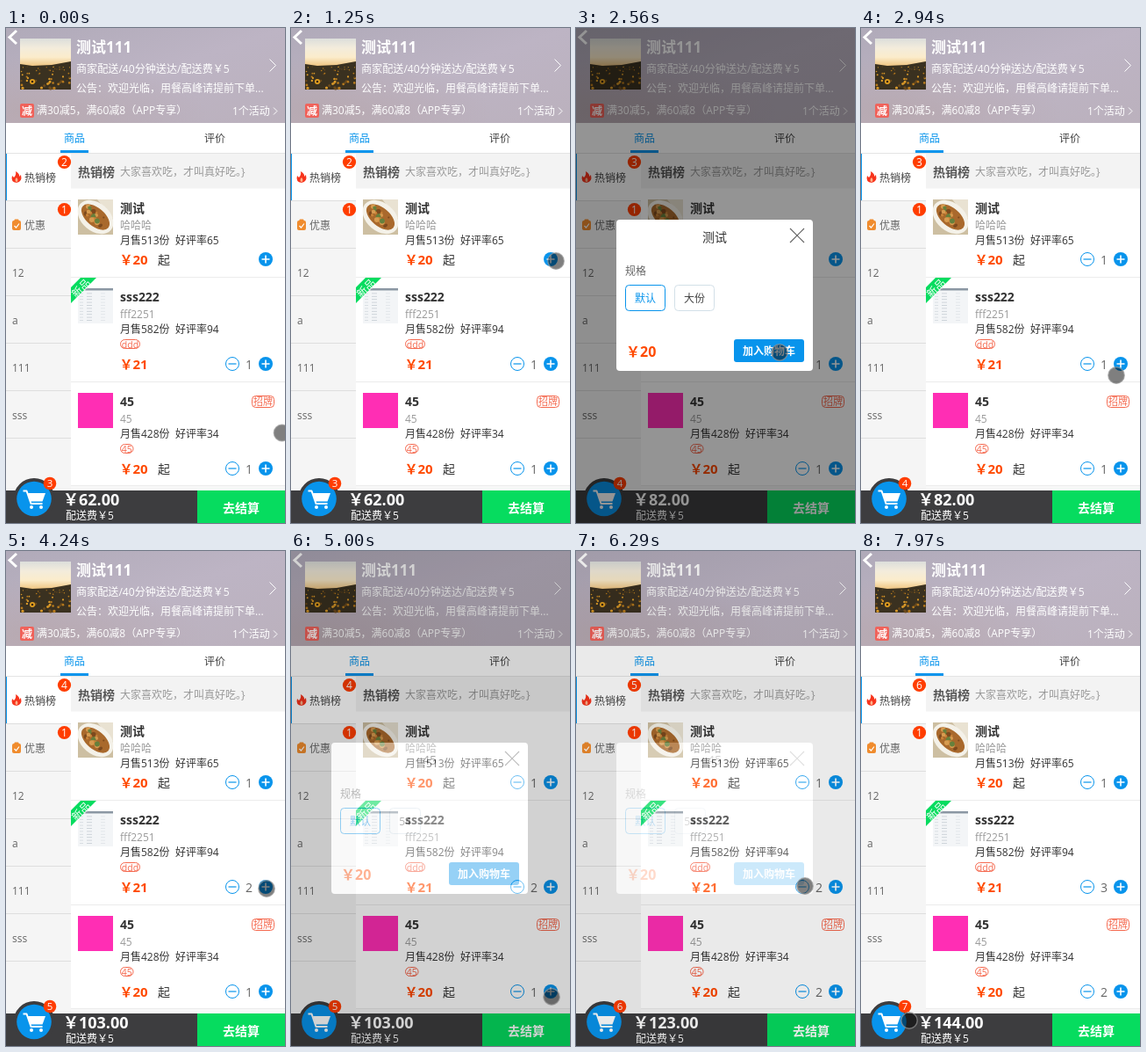
Animation of 318x563 px, one loop 8000 ms. Source, as an HTML page:

```html
<!DOCTYPE html>
<html lang="zh-CN">
<head>
<meta charset="utf-8">
<title>点餐</title>
<style>
html, body { margin: 0; width: 100%; height: 100%; overflow: hidden; background: #fff; }
svg { display: block; width: 318px; height: 563px; }
text { font-family: "Open Sans", "Noto Sans CJK SC", "Noto Sans CJK", "Noto Sans", sans-serif; white-space: pre; }
</style>
</head>
<body>
<svg id="stage" viewBox="0 0 318 563" xmlns="http://www.w3.org/2000/svg"></svg>
<script>
const BLUE = '#0894ec', RED = '#ff4a00', BADGE = '#ff3d00', TAG = '#f5694f', BAR = '#3d3d3f', GREEN = '#06dc5f';
const BOLD = 'font-weight="700"', MID = 'text-anchor="middle"';
const $ = id => document.getElementById(id);
const clamp = v => Math.max(0, Math.min(1, v));

const rect = (x, y, w, h, fill, extra = '') =>
  `<rect x="${x}" y="${y}" width="${w}" height="${h}" fill="${fill}" ${extra}/>`;
const circle = (x, y, r, fill, extra = '') =>
  `<circle cx="${x}" cy="${y}" r="${r}" fill="${fill}" ${extra}/>`;
const line = (d, color, w = 1, extra = '') =>
  `<path d="${d}" fill="none" stroke="${color}" stroke-width="${w}" ${extra}/>`;
const shape = (d, fill) => `<path d="${d}" fill="${fill}"/>`;
const text = (x, y, s, size, fill, extra = '') =>
  `<text x="${x}" y="${y}" font-size="${size}" fill="${fill}" ${extra}>${s}</text>`;
const outline = color => `stroke="${color}" stroke-width="1"`;

function seeded(seed) {
  return () => (seed = (seed * 16807) % 2147483647) / 2147483647;
}

function field() {
  const rnd = seeded(77);
  let s = rect(16, 12, 58, 58, 'url(#sky)') + shape('M16 41L30 43 52 42 74 38V70H16Z', '#3a3120');
  for (let i = 0; i < 60; i++) {
    const d = rnd(), x = 17 + rnd() * 56, y = 44 + d * 25;
    s += circle(x.toFixed(1), y.toFixed(1), (0.6 + d).toFixed(1), ['#6b4a1c', '#b97c1e', '#d99a2a'][i % 3]);
  }
  return s + circle(30, 61, 3, '#e3a120') + circle(30, 61, 1.3, '#3a2410');
}

function header() {
  return rect(0, 0, 318, 108, 'url(#head)') + rect(0, 0, 318, 108, 'url(#glow)')
    + line('M12 3L4 10.5 12 18', '#fff', 3) + field()
    + text(80, 28, '测试111', 17, '#fff', BOLD)
    + text(80, 51, '商家配送/40分钟送达/配送费￥5', 12.1, '#fff')
    + text(80, 73, '公告：欢迎光临，用餐高峰请提前下单...', 12, '#fff')
    + line('M300.5 35.5l7 7-7 7', '#fff')
    + rect(16, 86, 16, 16, '#f0625a', 'rx="2"') + text(24, 98.5, '减', 12, '#fff', MID + ' ' + BOLD)
    + text(35, 98, '满30减5，满60减8（APP专享）', 12, '#fff')
    + text(258, 99, '1个活动', 12, '#fff') + line('M305 90.5l4 4-4 4', '#fff');
}

function tabs() {
  return rect(0, 108, 318, 35, '#fff') + rect(0, 142, 318, 1, '#e4e4e4')
    + text(78, 130, '商品', 12, BLUE, MID) + text(238, 130, '评价', 12, '#444', MID)
    + rect(62, 139, 32, 3, BLUE);
}

function badge(x, y, r, size, id, n) {
  return circle(x, y, r, BADGE) + text(x, y + size * 0.37, n, size, '#fff', `${MID} id="${id}"`);
}

function sidebar() {
  let s = rect(0, 143, 74, 383, '#f5f5f5') + rect(0, 143, 74, 53, '#fff') + rect(0, 143, 1, 53, BLUE);
  ['热销榜', '优惠', '12', 'a', '111', 'sss'].forEach((label, i) => {
    s += rect(0, 196 + 54 * i, 74, 1, '#dedede') + text(i < 2 ? 21 : 7, 175 + 54 * i, label, 12, i ? '#666' : '#444');
  });
  s += shape('M11 163Q16 166 15 169L17 167Q19 175 12 176 5 175 7 168L9 170Q12 167 11 163Z', '#f7341c')
    + shape('M12 170Q15 173 12 175.5 9 173 12 170Z', '#ffb08a')
    + rect(7, 219, 10, 11, '#f08c2e', 'rx="2"') + rect(9.5, 217.5, 5, 3, '#f08c2e', 'rx="1"')
    + line('M9.5 225l2 2 3.5-4.5', '#fff', 1.2);
  return s + badge(66.5, 152.5, 7.6, 12, 'hot', 2) + badge(66.5, 206.5, 7.6, 12, 'sale', 1);
}

function food(y) {
  const rnd = seeded(9), cy = y + 20, turn = `transform="rotate(40 102 ${cy})"`;
  let s = rect(82, y, 40, 40, '#cdbfa2') + shape(`M104 ${y}h18v22Z`, '#e9e2d2')
    + `<ellipse cx="102" cy="${cy}" rx="23" ry="16" fill="#f4f1e8" ${turn}/>`
    + `<ellipse cx="102" cy="${cy}" rx="19" ry="10.5" fill="#a9692c" ${turn}/>`;
  for (let i = 0; i < 22; i++) {
    const u = (rnd() - 0.5) * 28, v = (rnd() - 0.5) * 12;
    s += circle((102 + u * 0.77 - v * 0.64).toFixed(1), (cy + u * 0.64 + v * 0.77).toFixed(1), (1 + rnd() * 2).toFixed(1),
      ['#d79b50', '#7d4a1e', '#c98238', '#66803c'][i % 4]);
  }
  return s;
}

function sheetPic(y) {
  let s = rect(82, y, 40, 40, '#f3f5f7') + rect(82, y, 40, 2.5, '#8b97a3');
  for (let i = 0; i < 10; i++) {
    const ly = y + 5.5 + i * 3.4;
    s += rect(84, ly, 4, 0.8, '#d3d9df') + rect(92, ly, 6, 0.8, '#c5ccd3') + rect(108, ly, 5, 0.8, '#dfe3e7');
  }
  return s;
}

const pinkPic = y => rect(82, y, 40, 40, '#ff2eb4');

const ITEMS = [
  { y: 195, name: '测试', desc: '哈哈哈', sold: 513, rate: 65, price: 20, more: true, pic: food, step: 68 },
  { y: 296, name: 'sss222', desc: 'fff2251', sold: 582, rate: 94, price: 21, tag: 'ddd', tagW: 23, pic: sheetPic, step: 86 },
  { y: 415, name: '45', desc: '45', sold: 428, rate: 34, price: 20, more: true, tag: '45', tagW: 15.5, pic: pinkPic, step: 86 }
];

function item(it, i) {
  const { y } = it, cy = y + it.step;
  let s = it.pic(y) + text(130, y + 15, it.name, 14, '#333', BOLD)
    + text(130, y + 33.5, it.desc, 12, '#999')
    + text(130, y + 51, `月售${it.sold}份`, 12, '#333') + text(193, y + 51, `好评率${it.rate}`, 12, '#333')
    + text(129.5, cy + 6, '￥' + it.price, 15, RED, BOLD);
  if (it.more) s += text(173, cy + 6, '起', 14, '#333');
  if (it.tag) s += rect(130.5, y + 58.5, it.tagW - 1, 10, 'none', `rx="5" ${outline(TAG)}`)
    + text(130 + it.tagW / 2, y + 67.5, it.tag, 10.5, TAG, MID);
  return s + `<g id="less${i}">` + circle(258, cy, 7.5, '#fff', outline(BLUE)) + line(`M253.5 ${cy}h9`, BLUE, 1.2)
    + text(277, cy + 5.5, '', 14, '#666', `${MID} id="qty${i}"`) + '</g>'
    + circle(296, cy, 8, BLUE) + line(`M291.5 ${cy}h9M296 ${cy - 4.5}v9`, '#fff', 1.6);
}

function goods() {
  return rect(74, 143, 244, 383, '#fff') + rect(74, 143, 244, 39.5, '#f3f3f3')
    + text(82, 169, '热销榜', 14, '#555', BOLD) + text(130, 168, '大家喜欢吃，才叫真好吃。}', 12, '#999')
    + [283, 402, 520].map(y => rect(74, y, 244, 1, '#ececec')).join('')
    + rect(74, 521, 244, 5, '#f8f8f8')
    + ITEMS.map(item).join('')
    + shape('M85 284H103L74 313V295Z', GREEN)
    + text(0, 4.3, '新品', 12, '#fff', `${MID} transform="translate(85.5 296) rotate(-45)"`)
    + rect(280.5, 418.5, 25, 13, 'none', `rx="4" ${outline(TAG)}`) + text(293, 429.2, '招牌', 11, TAG, MID);
}

function footer() {
  return rect(0, 526, 318, 37, BAR) + rect(218, 526, 100, 37, GREEN)
    + text(268, 551, '去结算', 14, '#fff', MID + ' ' + BOLD)
    + circle(32, 535.5, 23.5, BAR) + circle(32, 535.5, 19.8, BLUE)
    + line('M19.5 526.5h4l5 14.500h13', '#fff', 2, 'stroke-linejoin="round"')
    + shape('M25 529H45L41.5 538.5H28Z', '#fff')
    + circle(29, 545, 2, '#fff') + circle(40, 545, 2, '#fff')
    + badge(50, 518, 7.3, 11.5, 'cart', 3)
    + text(65, 543, '', 18, '#fff', BOLD + ' id="total"') + text(68, 559, '配送费￥5', 12, '#fff');
}

function dialog() {
  return '<g id="dialog">' + rect(0, 0, 318, 563, '#000', 'opacity=".42"')
    + rect(46, 218, 224, 172, '#fff', 'rx="4"')
    + text(158, 243, '', 14, '#333', MID + ' id="title"')
    + line('M244 228l16 16m0-16l-16 16', '#666', 1.2)
    + text(56, 280.5, '规格', 12, '#666')
    + rect(56.5, 292.5, 45, 29, '#fff', `rx="4" ${outline(BLUE)}`) + text(79, 312, '默认', 12, BLUE, MID)
    + rect(112.5, 292.5, 45, 29, '#fff', `rx="4" id="optBox" ${outline('#d3e0e8')}`)
    + text(135, 312, '', 12, '#444', MID + ' id="opt"')
    + text(57, 374, '￥20', 16, RED, BOLD)
    + rect(180, 354, 80, 26, BLUE, 'rx="3"') + text(220, 371.5, '加入购物车', 12, '#fff', MID + ' ' + BOLD)
    + '</g>';
}

const gradient = (id, dir, ...colors) => `<linearGradient id="${id}" x1="0" y1="0" ${dir}>`
  + colors.map((c, i) => `<stop offset="${i / (colors.length - 1)}" stop-color="${c}"/>`).join('') + '</linearGradient>';

const defs = '<defs>'
  + gradient('sky', 'x2="0" y2=".55"', '#dcdedb', '#f3ecdc', '#fbeccb', '#eec27c')
  + gradient('head', 'x2="1" y2="1"', '#b0aab9', '#bdb4c4', '#bbb1bd')
  + `<radialGradient id="glow" cx=".12" cy=".9" r=".6"><stop offset="0" stop-color="#b6a6ab" stop-opacity=".8"/>
<stop offset="1" stop-color="#b6a6ab" stop-opacity="0"/></radialGradient></defs>`;

$('stage').innerHTML = defs + header() + tabs() + goods() + sidebar() + footer() + dialog()
  + circle(0, 0, 9.2, 'rgba(0,0,0,.5)', 'id="touch" stroke="rgba(150,150,150,.7)" stroke-width="1.4"');

// The screen refreshes once per beat; all times below are in beats.
const BEAT = 186.25, LEAD = 505;

const MOVES = [
  { at: 0, x: 316, y: 400 }, { at: 4, x: 302, y: 265 },
  { at: 10, x: 232, y: 369 }, { at: 11, x: 232, y: 369 },
  { at: 13, x: 291, y: 395 }, { at: 15, x: 297, y: 384 }, { at: 20, x: 297, y: 384 },
  { at: 24, x: 297, y: 507 }, { at: 29, x: 234, y: 369 }, { at: 31, x: 261, y: 381 },
  { at: 33, x: 296, y: 384 }, { at: 36, x: 296, y: 384 }, { at: 40, x: 55, y: 534 }
];
const ADDS = [{ at: 11, i: 0 }, { at: 19, i: 1 }, { at: 30, i: 2 }, { at: 36, i: 1 }];
const DIALOGS = [
  { open: 4.58, close: 11, title: '测试', opt: '大份', w: 46 },
  { open: 23.58, close: 29.6, title: '45', opt: '54', w: 36 }
];

function touchAt(beat, t) {
  if (beat < 0) return t < 150 ? { x: 314.5, y: 460.5 } : { x: 340, y: 460 };
  const k = MOVES.findIndex(m => m.at > beat);
  if (k < 0) return MOVES[MOVES.length - 1];
  const a = MOVES[k - 1], b = MOVES[k];
  const u = (beat - a.at) / (b.at - a.at), e = u * u * (3 - 2 * u);
  return { x: a.x + (b.x - a.x) * e, y: a.y + (b.y - a.y) * e };
}

function render(t) {
  const beat = Math.floor((t - LEAD) / BEAT);
  const done = ADDS.filter(add => add.at <= beat);
  const qty = [0, 1, 1];
  done.forEach(add => qty[add.i]++);
  qty.forEach((n, i) => {
    $('qty' + i).textContent = n;
    $('less' + i).style.display = n && (i || beat > ADDS[0].at) ? '' : 'none';
  });
  $('hot').textContent = 2 + done.length;
  $('cart').textContent = 3 + done.length;
  $('total').textContent = '￥' + done.reduce((sum, add) => sum + ITEMS[add.i].price, 62).toFixed(2);

  const d = DIALOGS[beat < 20 ? 0 : 1];
  $('title').textContent = d.title;
  $('opt').textContent = d.opt;
  $('opt').setAttribute('x', 112 + d.w / 2);
  $('optBox').setAttribute('width', d.w - 1);
  $('dialog').style.opacity = clamp(Math.min(beat - d.open, 1 - (beat - d.close) / 1.75));

  const p = touchAt(beat, t);
  $('touch').setAttribute('transform', `translate(${p.x} ${p.y})`);
}

const start = performance.now();
function loop() {
  render((performance.now() - start) % 8000);
  requestAnimationFrame(loop);
}
loop();
</script>
</body>
</html>
```
